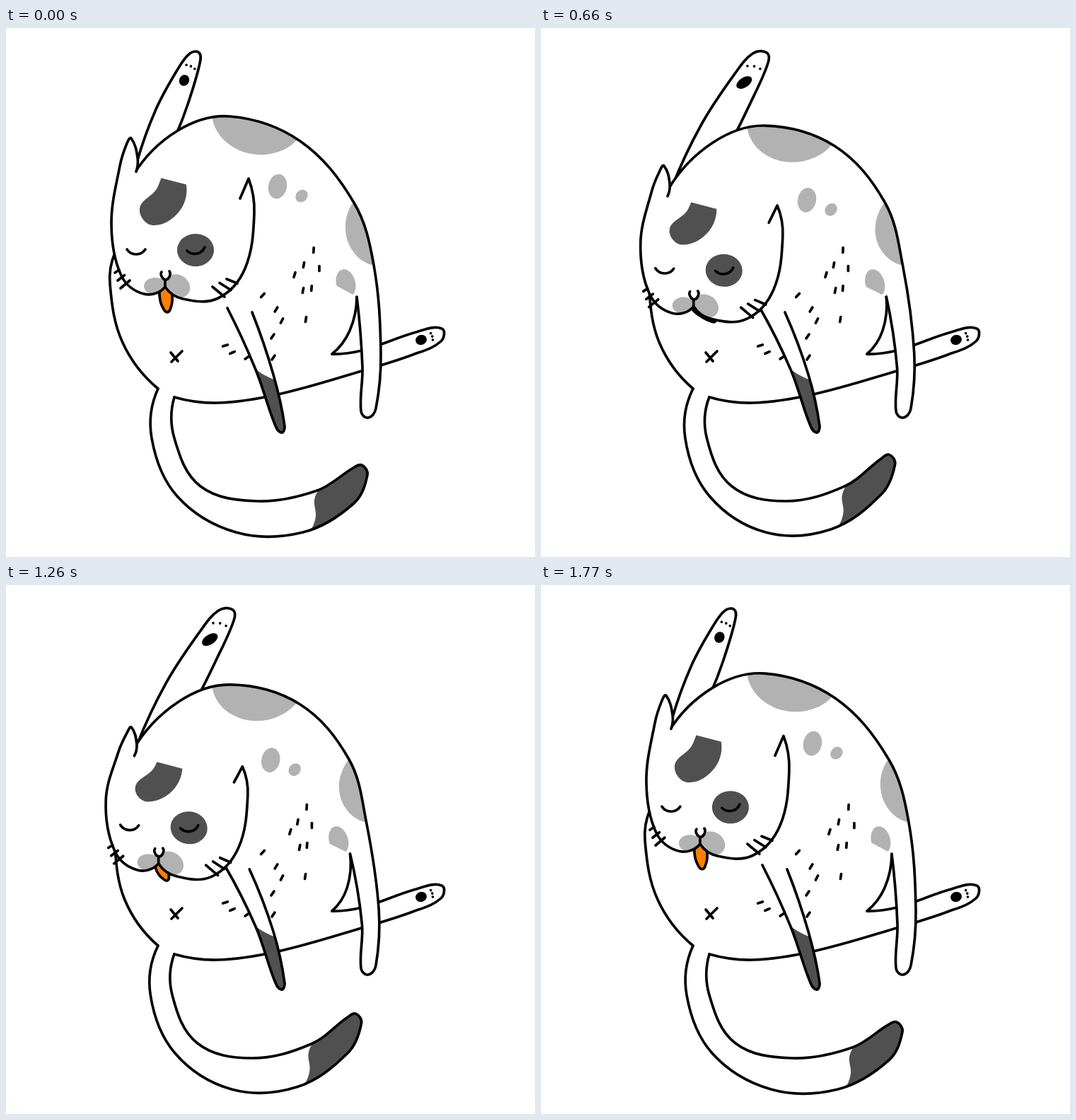
Write an HTML page with a canvas that moves like this. It is 748 by 748 pixels and loops after 1800 ms.

```html
<!DOCTYPE html>
<html lang="en">
<head>
<meta charset="utf-8">
<title>Cat washing itself</title>
<style>
html, body { margin: 0; width: 100%; height: 100%; overflow: hidden; background: #fff; }
canvas { display: block; }
</style>
</head>
<body>
<canvas id="stage" width="748" height="748"></canvas>
<script>
const ctx = document.getElementById('stage').getContext('2d');
const LOOP = 1800, STEP = 30;
const LIGHT = '#b2b2b2', DARK = '#505050', ORANGE = '#ff7f00', INK = '#000', WHITE = '#fff';
const TIMES = [0, 240, 480, 840, 1080, 1440, 1800];

// Progress of each part from the stretched pose (0) to the curled pose (1)
const KEYS = {
  body: [0, .105, .4, .88, 1, .5, 0],
  leg:  [0, .19, .56, .965, 1, .54, 0],
  face: [0, .15, .6, .98, 1, .57, 0],
  ears: [0, .03, .23, .81, 1, .5, 0],
  tail: [0, 0, .35, 1, 1, .15, 0],
  lean: [5, 45, 58, 52, 52, 5, 5],
  reach: [36, 42, 38, 37, 37, 17, 36]
};

// Monotone cubic through the key values
function ease(v, t) {
  const d = i => (v[i + 1] - v[i]) / (TIMES[i + 1] - TIMES[i]);
  const slope = i => {
    if (i < 1 || i > TIMES.length - 2) return 0;
    const a = d(i - 1), b = d(i);
    return a * b > 0 ? 2 * a * b / (a + b) : 0;
  };
  let i = 0;
  while (t >= TIMES[i + 1]) i++;
  const h = TIMES[i + 1] - TIMES[i], u = (t - TIMES[i]) / h, w = 1 - u;
  return v[i] * w * w * (1 + 2 * u) + v[i + 1] * u * u * (3 - 2 * u)
    + h * u * w * (slope(i) * w - slope(i + 1) * u);
}

const clamp = v => Math.max(0, Math.min(1, v));
const bump = (v, mid, half) => Math.abs(v - mid) < half ? Math.cos(Math.PI / 2 * (v - mid) / half) ** 2 : 0;
const still = (x, y) => [x, y];

// Warps: where a point of the stretched pose lies in the current one
const warps = p => ({
  body(x, y) {
    const hip = clamp((x - 340 - Math.max(0, y - 340)) / 100) * bump(y, 335, 215);
    const belly = clamp((240 - x) / 60) * bump(y, 370, 140);
    const sink = clamp((492 - x) / 308) ** .75 * clamp((310 - y) / 60);
    return [x + p.body * (8 * belly - 13 * hip), y + p.body * 30 * sink];
  },
  shoulder: (x, y) => [x - 12 * p.body, y + 29 * p.body],
  arm: (x, y) => [x - 5 * p.body * clamp((480 - y) / 84), y],
  leg: (x, y) => [x + p.leg * .65 * (x - 185), y + p.leg * Math.max(0, 44 - .6 * (x - 185))],
  tail(x, y) {
    const k = p.tail * clamp((y - 520) / 50);
    return [x - 14 * k * clamp((x - 160) / 230), y - 20 * k * clamp((x - 360) / 145) ** 1.5];
  },
  head(x, y) {
    const skew = 12 * clamp((300 - y) / 140) * clamp((360 - x) / 160);
    const drop = 24 * clamp((280 - y) / 110) * clamp(Math.abs(x - 255) / 80);
    return [x - 11 * p.face + skew * p.ears, y + 33 * p.face + (drop + .04 * (x - 225)) * p.ears];
  }
});

const unit = (x, y) => { const n = Math.hypot(x, y) || 1; return [x / n, y / n]; };

// Smooth curve through points; open ends bend like an arc
function curve(pts, closed) {
  const n = pts.length;
  const pt = i => pts[(i + n) % n];
  const chord = (i, j) => unit(pt(j)[0] - pt(i)[0], pt(j)[1] - pt(i)[1]);
  const mirror = ([tx, ty], [cx, cy]) => {
    const d = 2 * (tx * cx + ty * cy);
    return [d * cx - tx, d * cy - ty];
  };
  const dir = i => {
    if (closed || (i > 0 && i < n - 1)) return chord(i - 1, i + 1);
    if (n < 3) return chord(0, 1);
    return i ? mirror(chord(n - 3, n - 1), chord(n - 2, n - 1)) : mirror(chord(0, 2), chord(0, 1));
  };
  for (let i = 0; i < (closed ? n : n - 1); i++) {
    const [ax, ay] = pt(i), [bx, by] = pt(i + 1);
    const r = Math.hypot(bx - ax, by - ay) * .35;
    const [ux, uy] = dir(i), [vx, vy] = dir(i + 1);
    ctx.bezierCurveTo(ax + ux * r, ay + uy * r, bx - vx * r, by - vy * r, bx, by);
  }
}

// "x y x y | x y": a bar makes the point before it a corner
function trace(path, warp, closed) {
  let last;
  ctx.beginPath();
  for (const run of path.split('|')) {
    const v = run.trim().split(/\s+/).map(Number);
    const pts = [];
    for (let i = 0; i < v.length; i += 2) pts.push(warp(v[i], v[i + 1]));
    if (last) pts.unshift(last); else ctx.moveTo(...pts[0]);
    curve(pts, closed);
    last = pts.at(-1);
  }
}

function fill(color) { ctx.fillStyle = color; ctx.fill(); }
function line(path, warp) { trace(path, warp); ctx.stroke(); }

// White limb with markings kept inside its outline
function limb(path, warp, markings) {
  trace(path, warp);
  fill(WHITE);
  ctx.save();
  ctx.clip();
  markings?.();
  ctx.restore();
  line(path, warp);
}

function patch(path, warp, color, closed) { trace(path, warp, closed); fill(color); }

function spot(x, y, rx, ry, turn, warp, color) {
  const c = Math.cos(turn), s = Math.sin(turn), pts = [];
  for (let a = 0; a < 2 * Math.PI - .01; a += Math.PI / 6) {
    const u = rx * Math.cos(a), v = ry * Math.sin(a);
    pts.push(x + u * c - v * s, y + u * s + v * c);
  }
  patch(pts.join(' '), warp, color, true);
}

function paw(x, y, angle, gap, warp) {
  spot(x, y, 8, 7, angle, warp, INK);
  for (const turn of [-.3, 0, .3]) {
    const a = angle + turn;
    const [px, py] = warp(x + gap * Math.cos(a), y + gap * Math.sin(a));
    spot(px, py, 1.8, 1.8, 0, still, INK);
  }
}

const RAISED_LEG = '185 190 212 115 243 58 260 36 273 35 274 50 257 108 240 152';
const BELLY = '154 318 147 362 165 445 215 510';
const HIND = '238 522 300 530 385 518 503 485 575 462 615 443 616 425 580 430 503 456 461 461';
const THIGH = '461 461 486 428 496 380';
const BACK = '180 208 243 145 317 125 416 160 492 247 520 335 530 460 523 538 512 551 502 542 504 480 496 380';
const TAIL = '215 510 206 580 242 662 325 713 420 713 492 672 511 632 503 618 491 622 440 654 355 669 275 648 238 580 238 522';
const TAIL_TIP = '442 654 436 668 438 690 432 708 | 432 760 | 600 760 | 600 600 | 442 600';
const ARM = '313 396 353 483 380 560 389 572 394 563 378 490 348 402';
const CUFF = '352 482 366 491 379 497 | 420 497 | 420 600 | 340 600';
const HEAD = '331 241 343 213 | 351 262 338 340 300 382 250 383 225 366 | 195 376 163 350 149 278 161 195 171 163 177 156 186 183 184 203';
const EYE_PATCH = '231 199 254 217 246 258 208 279 189 256 212 229';
const FACE = ['171 313 184 320 197 313', '256 315 270 319 281 310', '220 345 226 356 231 344', '225 356 225 366'];
const FUR = '435 314 421 335 443 340 408 349 420 371 432 368 363 378 382 398 390 414 424 412 377 436 310 449 320 459 341 466 378 466';

// Each hair leans further the further left it grows
function drawFur(warp) {
  const v = FUR.split(' ').map(Number);
  for (let i = 0; i < v.length; i += 2) {
    const [x, y] = warp(v[i], v[i + 1]);
    const a = Math.max(0, 440 - v[i]) * .55 * Math.PI / 180;
    const dx = 3.5 * Math.sin(a), dy = 3.5 * Math.cos(a);
    line(`${x + dx} ${y - dy} ${x - dx} ${y + dy}`, still);
  }
}

function drawTongue(lean, reach, [x, y]) {
  const a = lean * Math.PI / 180, w = 9 - lean / 15;
  const out = (s, d) => [x + s * Math.sin(a) + d * Math.cos(a), y + s * Math.cos(a) - d * Math.sin(a)];
  const r = reach;
  patch(`0 ${-w * .7} ${r * .5} ${-w} ${r * .9} ${-w * .5} ${r} 0 ${r * .9} ${w * .5} ${r * .5} ${w} 0 ${w * .7}`, out, ORANGE, true);
  ctx.stroke();
}

function drawHead(head, lean, reach) {
  drawTongue(lean, reach, head(225, 366));
  limb(HEAD, head, () => {
    patch(EYE_PATCH, head, DARK, true);
    spot(268, 314, 26, 23, 0, head, DARK);
    spot(211, 365, 16, 12, 0, head, LIGHT);
    spot(242, 365, 19, 16, .5, head, LIGHT);
  });
  FACE.forEach(s => line(s, head));
  for (let i = 0; i < 3; i++) {
    line(`${292 + 10 * i} ${366 - 5.5 * i} ${309 + 9 * i} ${380 - 9.5 * i}`, head);
    line(`${154 + 4 * i} ${346 + 11 * i} ${160 + 7.5 * i} ${342 + 7.5 * i}`, head);
  }
}

function draw(t) {
  const pose = Object.fromEntries(Object.entries(KEYS).map(([name, v]) => [name, ease(v, t)]));
  const { body, shoulder, arm, leg, tail, head } = warps(pose);
  ctx.fillStyle = WHITE;
  ctx.fillRect(0, 0, 748, 748);
  ctx.lineWidth = 3.7;
  ctx.lineCap = ctx.lineJoin = 'round';

  limb(RAISED_LEG, leg);
  paw(252, 74, -1.13, 22, leg);

  line(BELLY, body);
  line(HIND, still);
  line(THIGH, body);
  paw(587, 441, -.3, 16.5, still);

  limb(BACK, body, () => {
    spot(358, 122, 67, 57, .12, body, LIGHT);
    spot(525, 283, 45, 53, -.1, body, LIGHT);
    spot(384, 224, 13, 17.5, .2, shoulder, LIGHT);
    spot(418, 237.5, 8, 9.5, .7, shoulder, LIGHT);
    spot(480.5, 361, 13.5, 20, -.25, body, LIGHT);
  });
  drawFur(body);
  line('233 459 243 471', still);
  line('249 457 234 472', still);

  limb(TAIL, tail, () => patch(TAIL_TIP, tail, DARK));
  limb(ARM, arm, () => patch(CUFF, arm, DARK));
  drawHead(head, pose.lean, pose.reach);
}

const start = performance.now();
function tick() {
  const t = (performance.now() - start) % LOOP;
  draw(Math.floor(t / STEP) * STEP);
  requestAnimationFrame(tick);
}
tick();
</script>
</body>
</html>
```
